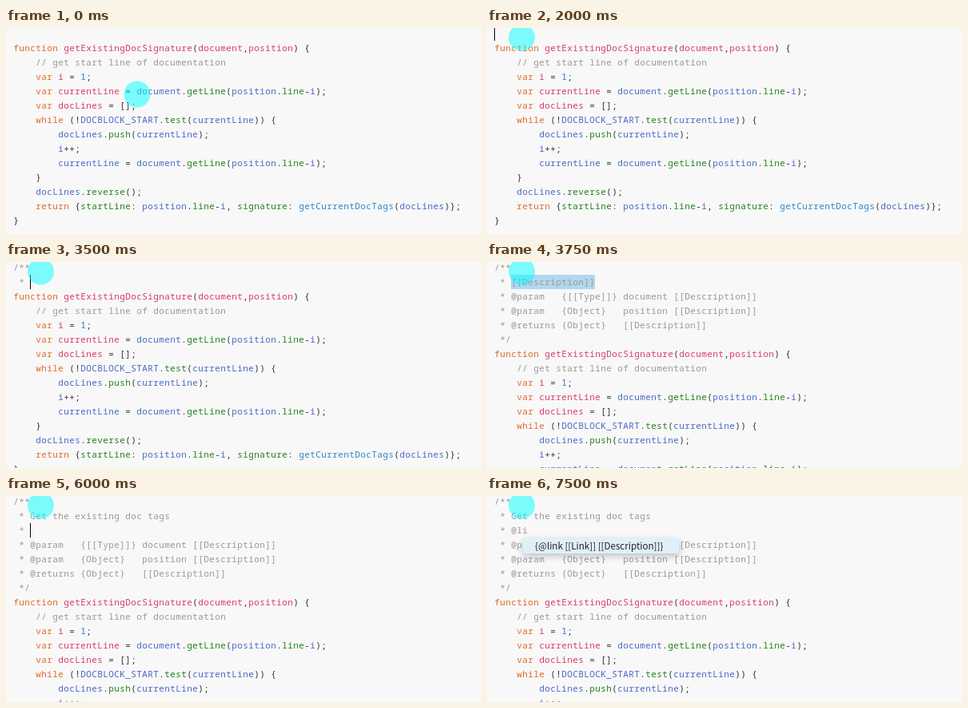
An HTML page with a canvas that plays this animation: 594x258 px, repeating every 8000 ms.

```html
<!DOCTYPE html>
<html lang="en">
<head>
<meta charset="utf-8">
<title>Doc comment typing</title>
<style>
html, body { margin: 0; width: 100%; height: 100%; overflow: hidden; background: #f8f8f8; }
canvas { display: block; width: 594px; height: 258px; }
</style>
</head>
<body>
<canvas id="stage"></canvas>
<script>
const W = 594, H = 258, LOOP = 8000;
const LEFT = 9, CHAR = 7, ROW = 18;
const CODE_FONT = '11px "Noto Sans Mono", monospace';
const MENU_FONT = '11.6px "Noto Sans CJK JP", "Noto Sans", sans-serif';

const INK = {
  plain: '#333333', comment: '#989898', keyword: '#e06a2c', def: '#d83c66',
  name: '#4a68c8', prop: '#25801f', call: '#3286c6', number: '#2f6fc4'
};

const CODE = `function getExistingDocSignature(document,position) {
    // get start line of documentation
    var i = 1;
    var currentLine = document.getLine(position.line-i);
    var docLines = [];
    while (!DOCBLOCK_START.test(currentLine)) {
        docLines.push(currentLine);
        i++;
        currentLine = document.getLine(position.line-i);
    }
    docLines.reverse();
    return {startLine: position.line-i, signature: getCurrentDocTags(docLines)};
}`.split('\n');

const TAGS = [
  ' * @param   {[[Type]]} document [[Description]]',
  ' * @param   {Object}   position [[Description]]',
  ' * @returns {Object}   [[Description]]',
  ' */'
];
const TITLE = ' * Get the existing doc tags';
const block = (...body) => ['/**', ...body, ...TAGS];

// Each step keeps whatever the previous one set.
const STEPS = [
  [0, { head: [''], caret: null, popup: null, selected: false }],
  [1750, { caret: [0, 0] }],
  [2250, { caret: null }],
  [2500, { head: ['/'], caret: [0, 1] }],
  [3000, { head: ['/*'], caret: [0, 2] }],
  [3250, { head: ['/**'], caret: [0, 3] }],
  [3500, { head: ['/**', ' * '], caret: [1, 3] }],
  [3750, { head: block(' * [[Description]]'), caret: null, selected: true }],
  [5500, { head: block(TITLE), caret: [1, 28], selected: false }],
  [6000, { head: block(TITLE, ' * '), caret: [2, 3] }],
  [6500, { caret: null }],
  [6750, { head: block(TITLE, ' * @l'), caret: [2, 5], popup: 37 }],
  [7000, { head: block(TITLE, ' * @li'), caret: [2, 6], popup: 45 }],
  [7500, { caret: null }]
];

const POINTER = [
  [0, 164, 83], [250, 72, 25], [500, 65, 14], [750, 56, 13], [1000, 55, 15],
  [1250, 41, 15], [1500, 45, 30], [1750, 38, 13], [2000, 43.5, 12]
];

const canvas = document.getElementById('stage');
const ctx = canvas.getContext('2d');
const dpr = window.devicePixelRatio || 1;
canvas.width = W * dpr;
canvas.height = H * dpr;

const colX = col => LEFT + col * CHAR;
const rowTop = row => row * ROW - 2;

function tokenColor(word, line, at) {
  const before = line.slice(0, at);
  if (/^(function|var|while|return)$/.test(word)) return INK.keyword;
  if (/^\d/.test(word)) return INK.number;
  if (!/^\w/.test(word)) return INK.plain;
  if (/(var|function) $/.test(before) || /^function .*\(/.test(before)) return INK.def;
  if (before.endsWith('.') || line[at + word.length] === ':') return INK.prop;
  return word === 'getCurrentDocTags' ? INK.call : INK.name;
}

// One glyph per editor column.
function write(text, col, row, color) {
  ctx.fillStyle = color;
  [...text].forEach((glyph, i) => {
    ctx.fillText(glyph, colX(col + i + 0.5), rowTop(row) + 13);
  });
}

function drawCodeLine(line, row) {
  if (line.trim().startsWith('//')) {
    write(line.trim(), line.search(/\S/), row, INK.comment);
    return;
  }
  for (const { 0: word, index } of line.matchAll(/\w+|[^\w\s]+/g)) {
    write(word, index, row, tokenColor(word, line, index));
  }
}

function drawPopup(x) {
  ctx.save();
  ctx.shadowColor = 'rgba(0,0,0,0.24)';
  ctx.shadowBlur = 9 * dpr;
  ctx.shadowOffsetY = 3 * dpr;
  ctx.fillStyle = '#e0f0fa';
  ctx.beginPath();
  ctx.roundRect(x, 53, 195, 19, 3);
  ctx.fill();
  ctx.restore();
  ctx.font = MENU_FONT;
  ctx.textAlign = 'left';
  ctx.fillStyle = '#222222';
  ctx.fillText('{@link [[Link]] [[Description]]}', x + 15, 67);
}

function stateAt(t) {
  return Object.assign({}, ...STEPS.filter(([start]) => start <= t).map(([, change]) => change));
}

function draw(t) {
  const { head, caret, popup, selected } = stateAt(t);
  ctx.setTransform(dpr, 0, 0, dpr, 0, 0);
  ctx.fillStyle = '#f8f8f8';
  ctx.fillRect(0, 0, W, H);

  if (selected) {
    ctx.fillStyle = '#b3d7f0';
    ctx.fillRect(colX(3), rowTop(1), 15 * CHAR, ROW);
  }

  ctx.font = CODE_FONT;
  ctx.textAlign = 'center';
  head.forEach((line, row) => write(line, 0, row, line === '/' ? INK.plain : INK.comment));
  CODE.forEach((line, i) => drawCodeLine(line, head.length + i));

  if (caret) {
    ctx.fillStyle = '#000000';
    ctx.fillRect(colX(caret[1]), rowTop(caret[0]), 1, ROW);
  }
  if (popup) drawPopup(popup);

  const [, x, y] = POINTER.filter(([start]) => start <= t).pop();
  ctx.fillStyle = 'rgba(0,255,255,0.5)';
  ctx.beginPath();
  ctx.arc(x, y, 16.5, 0, Math.PI * 2);
  ctx.fill();
}

const begin = performance.now();
function tick() {
  draw((performance.now() - begin) % LOOP);
  requestAnimationFrame(tick);
}
tick();
</script>
</body>
</html>
```
